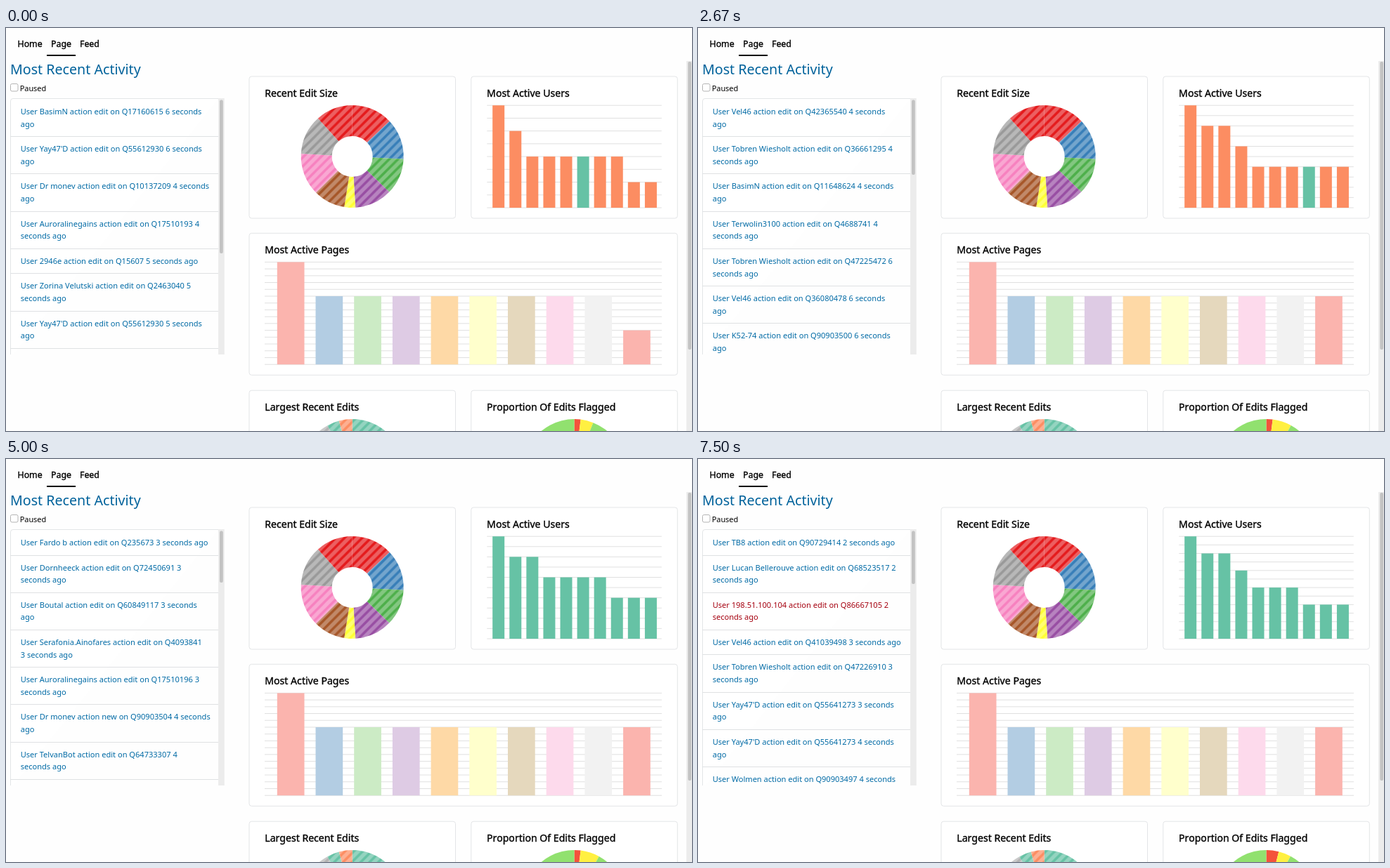
An HTML page that plays this animation: 976x574 px, repeating every 8000 ms.

```html
<!DOCTYPE html>
<html lang="en">
<head>
<meta charset="utf-8">
<title>Recent activity</title>
<style>
html, body { margin: 0; width: 100%; height: 100%; overflow: hidden; background: #fefefe; }
svg { display: block; width: 976px; height: 574px; font-family: "Noto Sans", "Open Sans", sans-serif; }
.nav, .title { stroke: #000; stroke-width: .35; }
.nav { font-size: 12.35px; }
.heading { font-size: 19.65px; fill: #00629b; }
.label { font-size: 10.9px; }
.title { font-size: 14.1px; }
.row { font-size: 11.06px; fill: #006aa5; }
.alert { fill: #a5000f; }
.card, .box { fill: #fff; stroke: #e3e5e7; }
.grid { stroke: #ddd; stroke-width: .89; }
.divider { stroke: #dfe1e3; }
.track { fill: #ececec; }
.thumb { fill: #c3c3c3; }
</style>
</head>
<body>
<svg viewBox="0 0 976 574">
  <defs id="patterns"></defs>
  <clipPath id="listClip"><rect x="0" y="95" width="320" height="370"/></clipPath>
  <g class="nav">
    <text x="16.5" y="27">Home</text><text x="64" y="27">Page</text><text x="105" y="27">Feed</text>
  </g>
  <rect x="58" y="38" width="41" height="2"/>
  <text class="heading" x="6" y="66">Most Recent Activity</text>
  <rect x="6.5" y="79.5" width="10.5" height="10.5" rx="2" fill="#fff" stroke="#b4b4b4"/>
  <text class="label" x="19.7" y="90.3">Paused</text>
  <g clip-path="url(#listClip)">
    <path class="box" d="M6.5 470V104q0-3.5 3.5-3.5H302"/>
    <g id="list"></g>
    <rect class="track" x="302" y="100" width="8.7" height="370"/>
    <rect class="thumb" id="thumb" x="304" y="102.5" width="4.8" rx="2"/>
  </g>
  <rect class="track" x="968" y="47" width="8" height="527"/>
  <rect class="thumb" x="970.3" y="48" width="4.8" height="410" rx="2"/>
  <g id="cards"></g>
  <g id="users"></g>
  <g id="pages"></g>
  <g id="flagged" transform="translate(808.5 630)"></g>
</svg>
<script>
const byId = id => document.getElementById(id);
const SET1 = ['#e41a1c', '#377eb8', '#4daf4a', '#984ea3', '#ffff33', '#a65628', '#f781bf', '#999999'];
const SET2 = ['#66c2a5', '#fc8d62', '#b3b3b3'];
const PASTEL = ['#fbb4ae', '#b3cde3', '#ccebc5', '#decbe4', '#fed9a6', '#ffffcc', '#e5d8bd', '#fddaec', '#f2f2f2'];
const [TEAL, ORANGE, GRAY] = SET2;
const PLOT_HEIGHT = 145.8;

// Newest first: user, item, wrap point, action. A leading "!" marks a flagged edit.
// Wrap point: 0 none, 1 before "ago", 2 before "seconds", 3 before the age.
const feed = [
  ['TB8', 90729414, 0], ['Lucan Bellerouve', 68523517, 2], ['!198.51.100.104', 86667105, 2],
  ['Vel46', 41039498, 0], ['Tobren Wiesholt', 47226910, 2], ["Yay47'D", 55641273, 1],
  ["Yay47'D", 55641273, 1], ['Wolmen', 90903497, 1], ['Firo4', 27891774, 0], ['!Parvinekabidi', 938644, 2],
  ['Fardo b', 235673, 0], ['Dornheeck', 72450691, 2], ['Boutal', 60849117, 1],
  ['Serafonia.Ainofares', 4093841, 3], ['Auroralinegains', 17510196, 2],
  ['Dr monev', 90903504, 1, 'new'], ['TelvanBot', 64733307, 2], ['Firo4', 63930391, 0], ['Zorina Velutski', 2463040, 2],
  ['Vel46', 42365540, 1], ['Tobren Wiesholt', 36661295, 2], ['BasimN', 11648624, 1], ['Terwolin3100', 4688741, 2],
  ['Tobren Wiesholt', 47225472, 2], ['Vel46', 36080478, 1], ['K52-74', 90903500, 1],
  ['Wolmen', 90903497, 1], ['Eieieieieie', 1540073, 1], ['!K52-74', 90903500, 1],
  ['BasimN', 17160615, 1], ["Yay47'D", 55612930, 1], ['Dr monev', 10137209, 1], ['Auroralinegains', 17510193, 2],
  ['2946e', 15607, 0], ['Zorina Velutski', 2463040, 2], ["Yay47'D", 55612930, 1]
];

// Each timeline entry starts with its time in ms.
const listSteps = [ // first feed entry, age per row, thumb end
  [0, 29, '6644555', 321], [200, 23, '3333326', 238], [1170, 21, '2244444', 222],
  [1670, 19, '3333555', 209], [2670, 19, '4444666', 209], [3170, 15, '2222444', 190],
  [3670, 15, '3333555', 190], [4170, 10, '2222233', 176], [5000, 10, '3333344', 176],
  [5700, 6, '22223333', 177], [6000, 6, '33334444', 177], [6200, 3, '22233334', 178],
  [6630, 3, '33344445', 178], [7500, 0, '22233344', 178]
];
const userSteps = [ // values, index of the odd teal bar (-1: all teal)
  [0, '4322222211', 5], [570, '4432222222', 6], [2170, '5443222222', 7],
  [4500, '5443333222', -1], [6200, '6554333222', -1]
];
const pageSteps = [[0, '3222222221'], [200, '3222222222']];
const flagSteps = [[0, 1, 3, 50], [1170, 1, 4, 50], [7030, 2, 4, 51]]; // red end, yellow end, total

function slice(from, to, fill, inner = 29, outer = 73) {
  const at = (r, deg) => {
    const a = deg * Math.PI / 180;
    return `${(r * Math.sin(a)).toFixed(2)} ${(-r * Math.cos(a)).toFixed(2)}`;
  };
  const big = to - from > 180 ? 1 : 0;
  return `<path fill="${fill}" d="M${at(outer, from)}A${outer} ${outer} 0 ${big} 1 ${at(outer, to)}` +
    `L${at(inner, to)}A${inner} ${inner} 0 ${big} 0 ${at(inner, from)}Z"/>`;
}

// Pale diagonal bands over a solid colour, one band crossing the tile corner.
function stripePattern(color) {
  const s = 12.54;
  return `<pattern id="p${color.slice(1)}" width="${s}" height="${s}" patternUnits="userSpaceOnUse">` +
    `<rect width="${s}" height="${s}" fill="${color}"/>` +
    `<path d="M${-s} ${s}L${s} ${-s}M${-s} ${2 * s}L${2 * s} ${-s}M0 ${2 * s}L${2 * s} 0" ` +
    `stroke="#fff" stroke-opacity=".3" stroke-width="5.32"/></pattern>`;
}

const striped = color => `url(#p${color.slice(1)})`;
const ring = (x, y, stops, colors) => `<g transform="translate(${x} ${y})">` +
  colors.map((c, i) => slice(stops[i], stops[i + 1], striped(c))).join('') + '</g>';

function barChart(x, y, width, max, lines, values, first, step, barWidth, color) {
  let out = '';
  for (let i = 0; i <= lines; i++) {
    const ly = y + PLOT_HEIGHT * i / lines;
    out += `<line class="grid" x1="${x}" x2="${x + width}" y1="${ly}" y2="${ly}"/>`;
  }
  [...values].forEach((v, i) => {
    const h = PLOT_HEIGHT * v / max;
    out += `<rect x="${first + i * step}" y="${y + PLOT_HEIGHT - h}" width="${barWidth}" height="${h}" fill="${color(i)}"/>`;
  });
  return out;
}

function drawList([, start, ages, thumbEnd]) {
  let y = 101, out = '';
  [...ages].forEach((age, i) => {
    const [user, item, wrap, action = 'edit'] = feed[start + i];
    const style = user[0] === '!' ? 'row alert' : 'row';
    const words = [`User ${user.replace('!', '')} action ${action} on Q${item}`, age, 'seconds', 'ago'];
    const cut = 4 - wrap;
    [words.slice(0, cut), words.slice(cut)].forEach((line, n) => {
      out += `<text class="${style}" x="20.7" y="${(y + 22 + n * 17.75).toFixed(2)}">${line.join(' ')}</text>`;
    });
    y += wrap ? 53.22 : 35.5;
    const dy = Math.round(y) + 0.5;
    out += `<line class="divider" x1="6" x2="302" y1="${dy}" y2="${dy}"/>`;
  });
  byId('list').innerHTML = out;
  byId('thumb').setAttribute('height', thumbEnd - 102.5);
}

function drawUsers([, values, teal]) {
  const max = +values[0];
  byId('users').innerHTML = barChart(684.3, 110.2, 248.5, max, max * 2, values, 692.2, 24.08, 17,
    i => teal < 0 || i === teal ? TEAL : ORANGE);
}

function drawPages([, values]) {
  byId('pages').innerHTML = barChart(368, 333.4, 565, 3, 15, values, 385.8, 54.7, 38.7, i => PASTEL[i % 9]);
}

function drawFlagged([, red, yellow, total]) {
  const r = red / total * 360, y = yellow / total * 360;
  byId('flagged').innerHTML = slice(0, r, '#f4523b') + slice(r, y, '#fff041') + slice(y, 360, '#91e16f');
}

const card = (x, y, w, title) =>
  `<rect class="card" x="${x}" y="${y}" width="${w}" height="202" rx="3.5"/>` +
  `<text class="title" x="${x + 22.3}" y="${y + 28.8}">${title}</text>`;

byId('patterns').innerHTML = [...SET1, ...SET2].map(stripePattern).join('');
byId('cards').innerHTML =
  card(346, 69, 293.5, 'Recent Edit Size') +
  card(661.8, 69, 293.5, 'Most Active Users') +
  card(346, 292.3, 609.3, 'Most Active Pages') +
  card(346, 516.2, 293.5, 'Largest Recent Edits') +
  card(661.8, 516.2, 293.5, 'Proportion Of Edits Flagged') +
  ring(492.7, 182.9, [0, 46.5, 93, 134, 176.5, 189, 225, 273, 318, 360], [...SET1, SET1[0]]) +
  ring(492.7, 630, [0, 90, 331, 345, 360], [TEAL, GRAY, TEAL, ORANGE]);

const tracks = [[listSteps, drawList], [userSteps, drawUsers], [pageSteps, drawPages], [flagSteps, drawFlagged]]
  .map(([steps, draw]) => ({ steps, draw, shown: null }));
const origin = performance.now();

function loop() {
  const t = (performance.now() - origin) % 8000;
  for (const track of tracks) {
    const step = track.steps.filter(s => s[0] <= t).pop();
    if (step !== track.shown) track.draw(track.shown = step);
  }
  requestAnimationFrame(loop);
}
loop();
</script>
</body>
</html>
```
